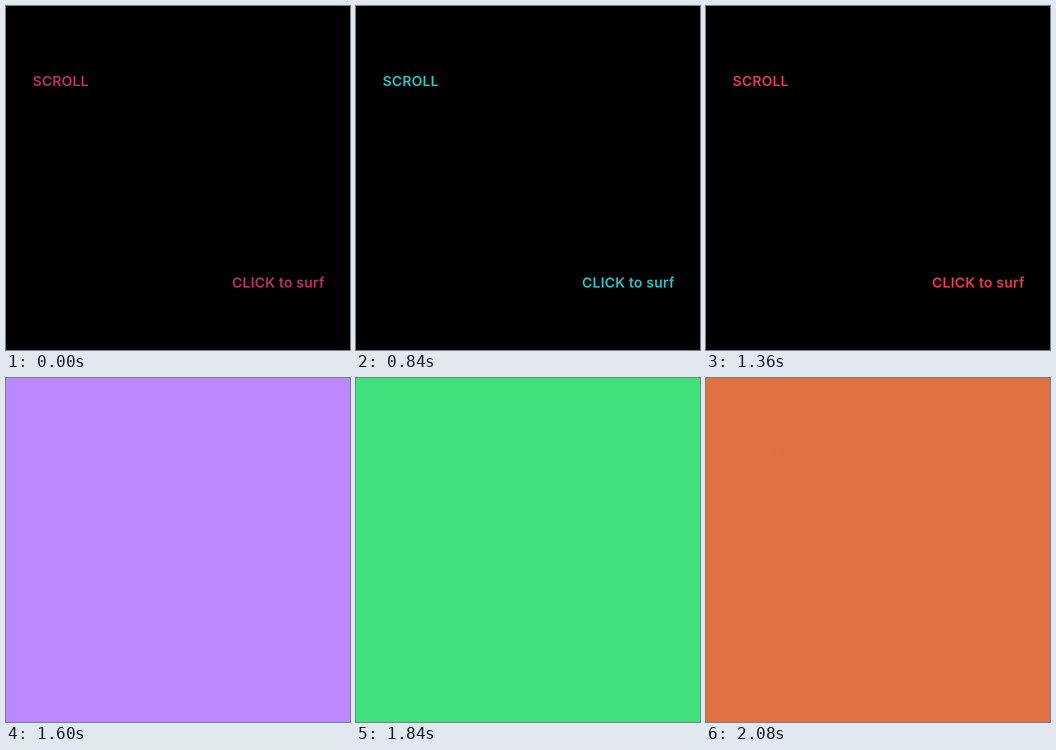
These frames come from a looping animation (640x640 px, 2.1 s). An HTML page:

```html
<!DOCTYPE html>
<html lang="en">
<head>
<meta charset="utf-8">
<style>
  html, body { margin: 0; width: 100%; height: 100%; overflow: hidden; background: #000; }
  svg { display: block; width: 100vw; height: 100vh; }
  text { font: 600 26px Inter, "Liberation Sans", sans-serif; letter-spacing: .35px; }
</style>
</head>
<body>
<svg viewBox="0 0 640 640">
  <rect id="cover" width="640" height="640"/>
  <g id="ink">
    <text x="49.4" y="148.8">SCROLL</text>
    <text x="420.6" y="524">CLICK to surf</text>
    <rect y="639" width="640" height="1" opacity=".06"/>
  </g>
</svg>
<script>
  const LOOP = 2100, STEP = 20, FLASH = 1500;
  const VIOLET = 266, PINK = 334, TURN = 376;
  const cover = document.getElementById('cover');
  const ink = document.getElementById('ink');

  // The hue runs backwards, lingering at teal, then twice as fast in the flash.
  function hueAt(t) {
    const u = t / FLASH;
    return u < 1
      ? PINK - TURN * u + 64 * Math.sin(Math.PI * u) ** 6
      : PINK - TURN - (t - FLASH) * .517;
  }

  // Violet tones are brighter; the text starts muted and gains strength.
  function colorAt(t) {
    const hue = hueAt(t);
    const glow = Math.max(0, Math.cos((hue - VIOLET) * Math.PI / 180));
    const strength = Math.min(1, .7 + .3 * (t / FLASH) ** 2);
    const sat = (72 + 28 * glow) * strength;
    const light = (56.5 + 20.2 * glow) * strength;
    return `hsl(${hue}, ${sat}%, ${light}%)`;
  }

  const start = performance.now();
  function draw() {
    const elapsed = (performance.now() - start) % LOOP;
    const t = Math.floor(elapsed / STEP) * STEP;
    const color = colorAt(t);
    ink.setAttribute('fill', color);
    cover.setAttribute('fill', t < FLASH ? '#000' : color);
    requestAnimationFrame(draw);
  }
  draw();
</script>
</body>
</html>
```
